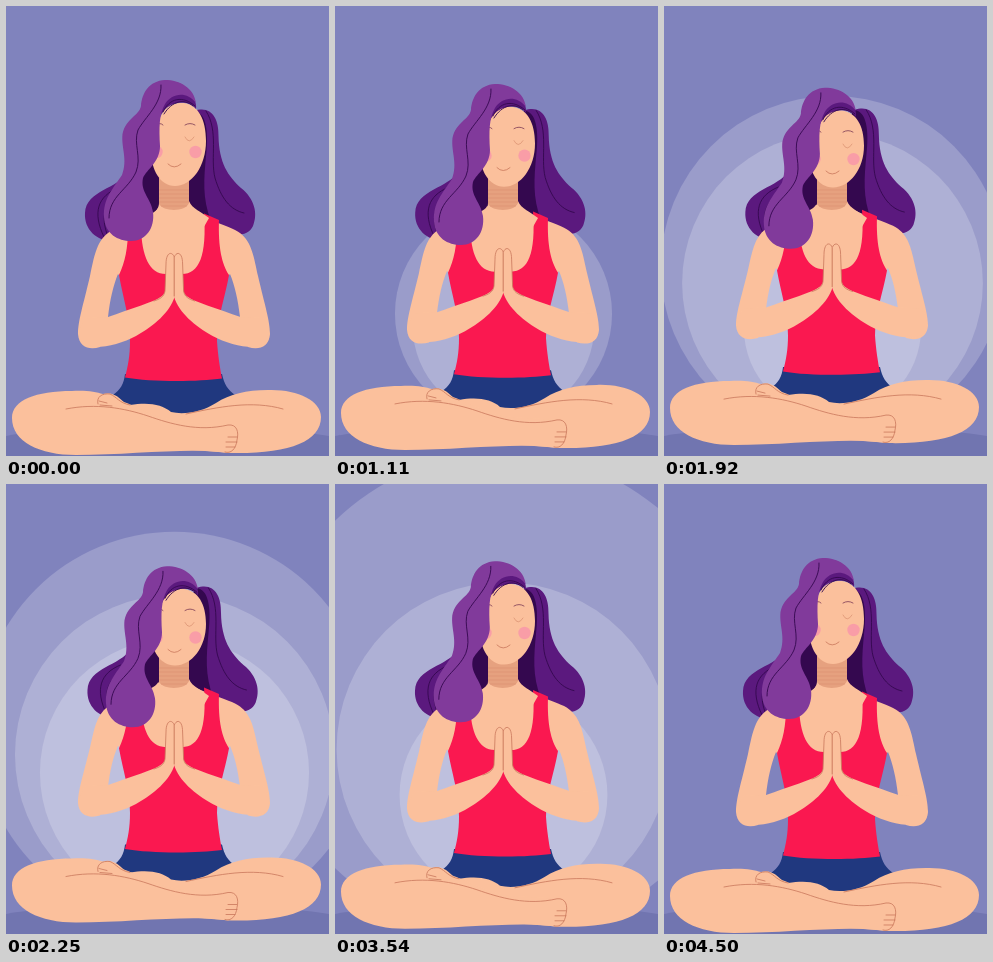
An HTML page that plays this animation: 323x450 px, repeating every 4.53 s.

```html
<!DOCTYPE html>
<html lang="en">
<head>
<meta charset="utf-8">
<title>Breathing meditation</title>
<style>
  html, body { margin: 0; width: 100%; height: 100%; overflow: hidden; background: #8083bd; }
  svg { display: block; width: 100%; height: 100%; }
  .skin { fill: #fbc09c; }
  .line { fill: none; stroke: #c9785c; stroke-width: .8; stroke-linecap: round; }
  .light { fill: #813a9b; }
  .mid { fill: #5b197e; }
  .dark { fill: #34084f; }
  .strand { fill: none; stroke: #34084f; stroke-width: .9; stroke-linecap: round; }
</style>
</head>
<body>
<svg viewBox="0 0 323 450">
  <g id="rings" fill="#fff" fill-opacity=".2"><circle/><circle/><circle/></g>
  <ellipse cx="161" cy="446" rx="205" ry="26" fill="#7175b0"/>

  <g id="backHair">
    <path class="mid" d="M122 166C112 183 80 184 79 207C78 223 90 235 108 236L135 220V180Z"/>
    <path class="strand" d="M112 182C92 190 86 206 98 231M117 184C101 196 92 208 103 233"/>
    <path class="mid" d="M188 105C205 99 213 112 212.500 130C213 157 222 170 235 182C249 193 252 208 247 220C242 231 225 232 205 222L180 205V175Z"/>
    <path class="dark" d="M188 105C200 106 203 125 200 150C198 172 196 192 205 215L183 220L130 215V160L155 155Z"/>
    <path class="strand" d="M200 105C213 125 204 152 209 172C215 192 224 204 238 207"/>
  </g>

  <path id="shorts" fill="#20387f" d="M119 368H216C218 378 222 384 229 389L215 415H120L107 389C114 384 118 378 119 368Z"/>

  <g id="arms" class="skin">
    <path id="arm" d="M152 202C148 211 112 219 102 227C90 236 88 252 84 270C77 300 72 315 72 328C73 342 84 344 94 341L102 311C104 294 107 280 112 268L122 280H169V202Z"/>
    <use href="#arm" transform="matrix(-1 0 0 1 336 0)"/>
  </g>

  <path id="shirt" fill="#fa1850" d="M122 222H135C136 250 143 268 160 268H176C193 268 201 250 198 207.500L213 214C212 242 216 258 223 269C219 292 211 312 211 335C212 350 214 362 216 372.500C190 376 145 376 119 371.500C122 360 124 350 124 335C124 312 117 292 113 269C119 256 122 242 122 222Z"/>

  <g id="legs">
    <path class="skin" d="M315 411C315 394 290 383 262 384C240 384 224 388 210 397C196 406 178 409 165 406C156 398 142 396 124 399L120 430L160 442L225 447C282 448 315 436 315 411Z"/>
    <path class="skin" d="M6 412C6 394 30 385 66 385C80 384 90 386 97 388C107 385 113 392 118 396C140 404 155 416 190 417L222 419C236 421 233 446 222 447C185 441 125 449 70 449C34 449 6 436 6 412Z"/>
    <path class="line" d="M60 403C90 397 118 402 142 410C165 418 192 426 222 419C231 418 233 426 231 434C230 443 225 448 219 446M180 408C212 401 246 394 277 403M92 398C90 391 96 387 104 388C111 391 113 397 124 399M93 395L101 397M94 399L106 400M222 431H231M220 436H231M220 441H229"/>
  </g>

  <path class="skin" d="M153 172H183V195C186 203 196 206 203 212L190 235H147L135 226C138 211 153 208 153 197Z"/>
  <path fill="#e6a17f" d="M153 172H183V197C180 206 157 206 153 198Z"/>
  <path fill="none" stroke="#d88e70" stroke-width=".6" d="M153 184H183M153 188H183M153 192H183M153 196H183M155 200H181"/>

  <path id="face" class="skin" d="M152 120C155 101 167 96 178 97C192 99 200 113 200 135C200 160 186 180 169 180C154 180 145 163 145 145Z"/>
  <g id="features">
    <g fill="#f99da7"><circle cx="189.500" cy="146" r="6.200"/><circle cx="150.500" cy="146" r="6.200"/></g>
    <path class="line" d="M162 158Q168 164 175 158"/>
    <path class="line" stroke-opacity=".6" d="M179 131Q183 139 188 131"/>
    <path class="line" style="stroke:#7b3a55" d="M179 119Q184 116 189 119M150 119Q154 116 157 119"/>
  </g>

  <g id="frontHair">
    <path class="mid" d="M152 122C152 105 164 96 177 96.500C184 97 188 100 190 103C191 97 188 90 180 86L155 85L146 110Z"/>
    <path class="light" d="M190 97C188 82 174 74 159 74C143 75 136 87 135 100C133 110 120 112 116.500 128C115 142 122 153 116 169C106 184 97 193 98 211C99 228 112 235 125 235C140 235 149 222 147 206C145 192 134 186 137 172C141 163 154 156 154 140C153 122 153 108 159 98C165 88 180 84 190 97Z"/>
    <path class="strand" d="M155 79C156 98 139 111 132 124C127 138 136 151 130 166C122 184 103 190 103 212M157 106C163 92 177 89 189 100M158 108C166 95 178 92 187 100"/>
  </g>

  <g id="hands">
    <g id="hand">
      <path class="skin" d="M76 337C84 345 112 340 130 330C148 320 164 306 168.500 291V251C166 245 160 246 160 258L159 285C157 293 148 295 102 311L80 312C73 320 71 330 76 337Z"/>
      <path class="line" d="M168.300 290V251C166 245 160 246 160 258L159 285C158 291 154 293 148 295"/>
    </g>
    <use href="#hand" transform="matrix(-1 0 0 1 336.600 0)"/>
  </g>
</svg>
<script>
  const LOOP = 4530;
  const byId = id => document.getElementById(id);
  const rings = [...byId('rings').children];

  // [time in ms, radius]
  const radii = [
    [[0, 30], [630, 72], [1560, 143.5], [2250, 196], [2850, 231], [3540, 242], [3780, 220], [4320, 95], [LOOP, 30]],
    [[0, 25], [630, 42], [1560, 136], [2250, 159.5], [2850, 195], [3540, 167], [4320, 75], [LOOP, 25]],
    [[0, 20], [1560, 40], [2250, 134.5], [2850, 127], [3540, 104], [4320, 50], [LOOP, 20]]
  ];

  // Smooth curve through unevenly spaced keys
  function sample(keys, t) {
    const i = Math.max(0, keys.findIndex(k => k[0] > t) - 1);
    const slope = n => {
      const a = keys[Math.max(0, n - 1)], b = keys[Math.min(keys.length - 1, n + 1)];
      return (b[1] - a[1]) / (b[0] - a[0]);
    };
    const [t0, a] = keys[i], [t1, b] = keys[i + 1];
    const h = t1 - t0, u = (t - t0) / h, v = 1 - u;
    return v * v * (1 + 2 * u) * a + u * u * (3 - 2 * u) * b
      + h * u * v * (v * slope(i) - u * slope(i + 1));
  }

  function move(id, x, y) {
    byId(id).setAttribute('transform', `translate(${x} ${y})`);
  }

  // Vertical stretch carrying y0 by d0 and y1 by d1
  function stretch(id, y0, d0, y1, d1) {
    const s = 1 + (d1 - d0) / (y1 - y0);
    byId(id).setAttribute('transform', `matrix(1 0 0 ${s} 0 ${y0 + d0 - y0 * s})`);
  }

  function draw(now) {
    const t = now % LOOP;
    const breath = (1 - Math.cos(2 * Math.PI * t / LOOP)) / 2;
    rings.forEach((ring, i) => {
      const r = sample(radii[i], t);
      ring.setAttribute('cx', 168.5);
      ring.setAttribute('cy', 387 - .73 * r);
      ring.setAttribute('r', r);
    });
    move('shorts', 0, -7.5 * breath);
    move('legs', 0, -10.5 * breath);
    move('hands', 0, -10 * breath);
    move('backHair', 2.5 * breath, -breath);
    move('frontHair', 2 * breath, 8.3 * breath);
    move('features', 0, 7.5 * breath);
    stretch('shirt', 214, -4 * breath, 373, -6.5 * breath);
    stretch('arms', 215, -4 * breath, 342, -9.5 * breath);
    stretch('face', 97, 8 * breath, 180, 1.5 * breath);
    requestAnimationFrame(() => draw(performance.now() - start));
  }

  const start = performance.now();
  draw(0);
</script>
</body>
</html>
```
